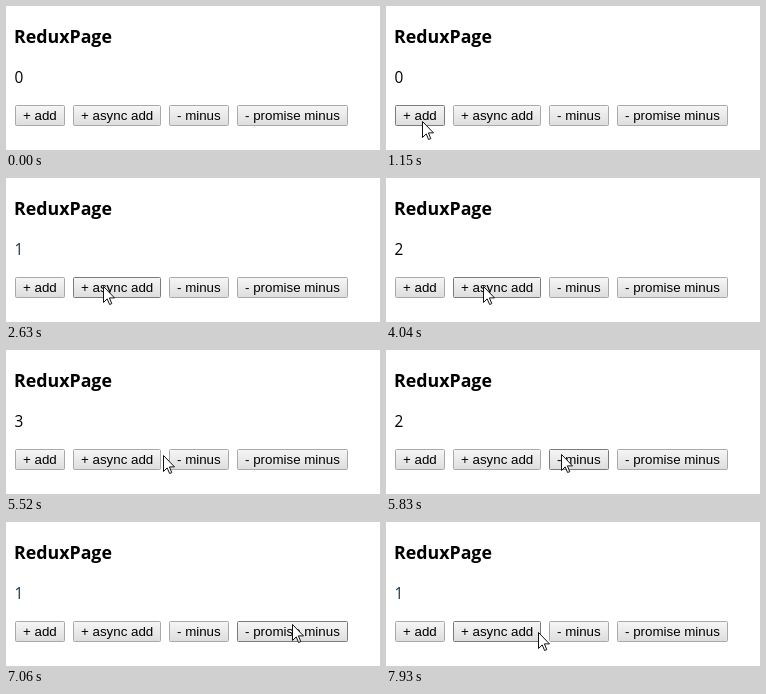
Write an HTML page that moves like this. It is 374 by 144 pixels and loops after 8 s.

```html
<!DOCTYPE html>
<html lang="en">
<head>
<meta charset="utf-8">
<title>ReduxPage</title>
<style>
  html, body { margin: 0; width: 100%; height: 100%; overflow: hidden; background: #fff; }
  svg { display: block; width: 374px; height: 144px; }
  .title { font: 700 17.8px "Open Sans", sans-serif; }
  .count { font: 400 15.4px "Open Sans", sans-serif; }
  .label { font: 13.333px "Liberation Sans", Arial, sans-serif; }
</style>
</head>
<body>
<svg id="stage" viewBox="0 0 374 144" xmlns="http://www.w3.org/2000/svg">
  <defs>
    <linearGradient id="up" x2="0" y2="1">
      <stop offset="0" stop-color="#f6f6f6"/><stop offset="1" stop-color="#dddddd"/>
    </linearGradient>
    <linearGradient id="down" x2="0" y2="1">
      <stop offset="0" stop-color="#d4d4d4"/><stop offset="1" stop-color="#ebebeb"/>
    </linearGradient>
  </defs>
  <rect width="374" height="144" fill="#fff"/>
  <text class="title" x="8" y="37">ReduxPage</text>
  <text class="count" id="count" x="8.5" y="77">0</text>
  <g id="buttons"></g>
  <path id="cursor" d="M.5 .5V16.5L4.2 12.9L6.6 18.5L8.8 17.6L6.4 11.9H11.5Z"
        fill="#fff" stroke="#111" stroke-width="1"/>
</svg>
<script>
const LOOP = 8000;
const TOP = 99, HEIGHT = 21;

const buttons = [
  { x: 9, w: 50, label: "+ add" },
  { x: 67, w: 88, label: "+ async add" },
  { x: 163, w: 60, label: "- minus" },
  { x: 231, w: 111, label: "- promise minus" }
];

// The pointer is sampled in steps: each move eases out to its end point.
const entry = { x: 62, y: 146 };
const moves = [
  { at: 850, step: 75, n: 5, x: 36, y: 115, pow: 2 },
  { at: 2160, step: 85, n: 5, x: 97, y: 108, pow: 2.2 },
  { at: 5370, step: 75, n: 5, x: 175, y: 104, pow: 1.6 },
  { at: 6290, step: 75, n: 7, x: 286, y: 102, pow: 1.6 },
  { at: 7610, step: 80, n: 5, x: 152, y: 110, pow: 1.2 }
];
const presses = [[1380, 1460], [2560, 2630], [3960, 4040], [5760, 5830], [7000, 7060]];
const changes = [[1460, 1], [3640, 1], [5050, 1], [5830, -1], [7060, -1]];

const byId = id => document.getElementById(id);
const countText = byId("count"), cursor = byId("cursor");

function add(parent, tag, attrs) {
  const el = document.createElementNS("http://www.w3.org/2000/svg", tag);
  for (const key in attrs) el.setAttribute(key, attrs[key]);
  return parent.appendChild(el);
}

for (const b of buttons) {
  b.box = add(byId("buttons"), "rect", {
    x: b.x + .5, y: TOP + .5, width: b.w - 1, height: HEIGHT - 1, rx: 1
  });
  add(byId("buttons"), "text", { class: "label", x: b.x + 8, y: 114 }).textContent = b.label;
}

function pointerAt(t) {
  if (t < moves[0].at) return null;
  let pos = entry;
  for (const m of moves) {
    if (t < m.at) break;
    const k = Math.min(m.n, Math.floor((t - m.at) / m.step) + 1);
    const e = 1 - Math.pow(1 - k / m.n, m.pow);
    pos = {
      x: Math.round(pos.x + (m.x - pos.x) * e),
      y: Math.round(pos.y + (m.y - pos.y) * e)
    };
  }
  return pos;
}

function draw(t) {
  const p = pointerAt(t);
  const pressed = presses.some(([from, to]) => t >= from && t < to);
  const count = changes.reduce((sum, [at, by]) => t >= at ? sum + by : sum, 0);

  countText.textContent = count;
  countText.setAttribute("fill", count === 1 ? "#12384f" : "#000");

  for (const b of buttons) {
    const hover = p && p.x >= b.x && p.x < b.x + b.w && p.y >= TOP && p.y < TOP + HEIGHT;
    b.box.setAttribute("fill", hover && pressed ? "url(#down)" : "url(#up)");
    b.box.setAttribute("stroke", hover ? "#7b7b7b" : "#a9a9a9");
  }

  cursor.setAttribute("visibility", p ? "visible" : "hidden");
  if (p) cursor.setAttribute("transform", `translate(${p.x} ${p.y})`);
}

let start;
function tick(now) {
  if (start === undefined) start = now;
  draw((now - start) % LOOP);
  requestAnimationFrame(tick);
}
draw(0);
requestAnimationFrame(tick);
</script>
</body>
</html>
```
